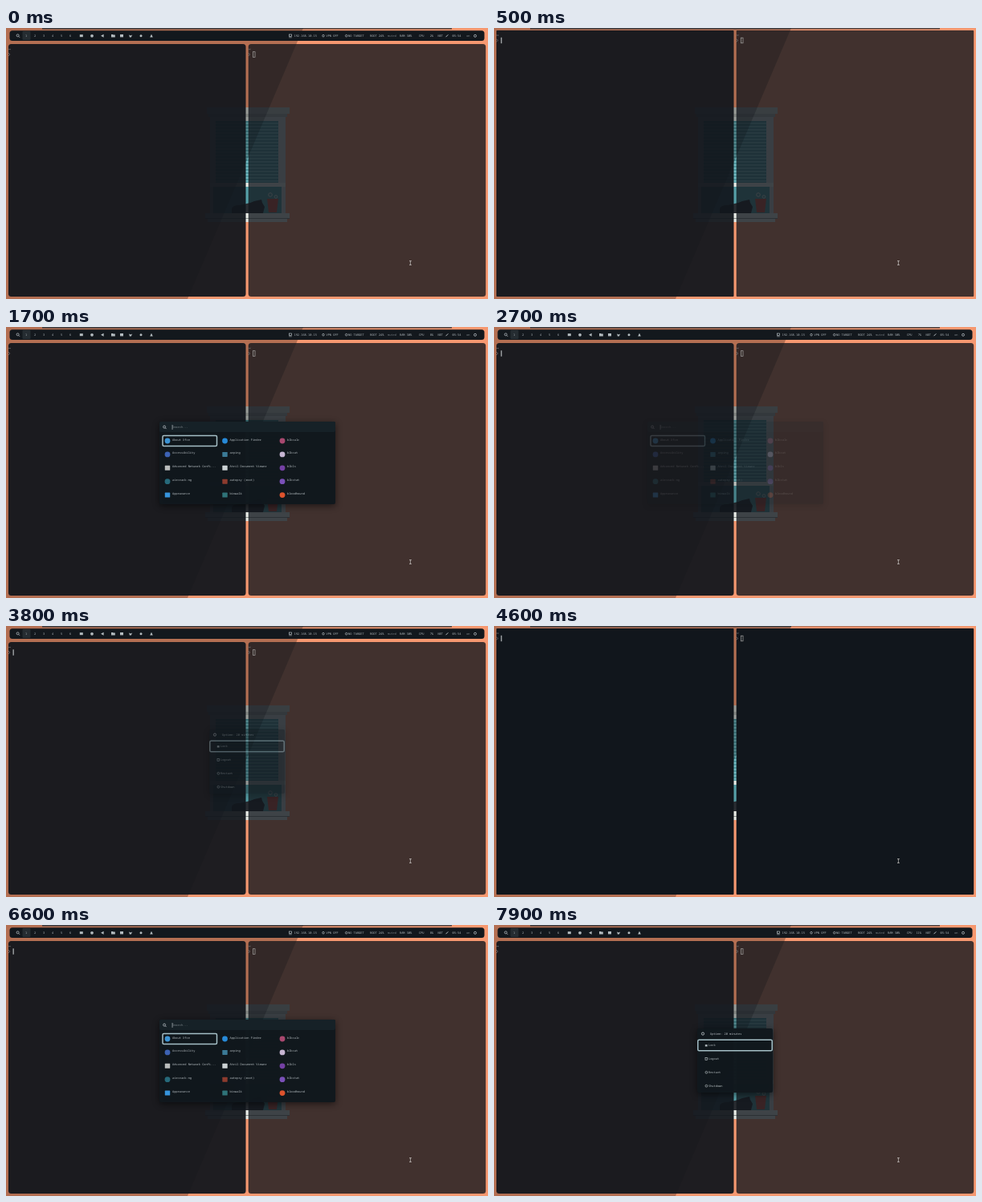
An HTML page that plays this animation: 600 by 338 pixels, repeating every 8000 ms.

```html
<!DOCTYPE html>
<html lang="en">
<head>
<meta charset="utf-8">
<title>Desktop</title>
<style>
html, body { margin: 0; width: 100%; height: 100%; overflow: hidden; background: #f69870; }
svg { display: block; width: 600px; height: 338px; }
text { font: 3.65px "Noto Sans Mono", "DejaVu Sans Mono", monospace; fill: #b4bcc0; text-rendering: geometricPrecision; white-space: pre; }
</style>
</head>
<body>
<svg id="stage" viewBox="0 0 600 338"></svg>
<script>
const stage = document.getElementById('stage');
const NS = 'http://www.w3.org/2000/svg';

function add(parent, tag, attrs = {}, text) {
  const el = document.createElementNS(NS, tag);
  for (const k in attrs) el.setAttribute(k, attrs[k]);
  if (text) el.textContent = text;
  parent.append(el);
  return el;
}
const group = (p, attrs) => add(p, 'g', attrs);
const rect = (p, x, y, width, height, fill, more) => add(p, 'rect', { x, y, width, height, fill, ...more });
const dot = (p, cx, cy, r, fill, more) => add(p, 'circle', { cx, cy, r, fill, ...more });
const path = (p, d, fill, more) => add(p, 'path', { d, fill, ...more });
const label = (p, x, y, s, more) => add(p, 'text', { x, y, ...more }, s);
const line = (p, d, stroke, width = .6) => path(p, d, 'none', { stroke, 'stroke-width': width });

const PALE = '#b4bcc0', DARK = '#11161c';

const blur = add(add(stage, 'defs'), 'filter', { id: 'blur', x: '-20%', y: '-20%', width: '140%', height: '140%' });
add(blur, 'feGaussianBlur', { stdDeviation: 4 });

// Wallpaper
const wall = group(stage);
rect(wall, 0, 0, 600, 338, '#f69870');
rect(wall, 250, 99, 103, 8, '#cfd3cd');
rect(wall, 252, 107, 98, 4, '#b3b7b3');
rect(wall, 254, 111, 94, 120, '#d2d7d3');
rect(wall, 261, 116, 78, 77, '#4f9aa2');
for (let y = 118; y < 193; y += 4) rect(wall, 261, y, 78, 1.8, '#79bfc6');
rect(wall, 258, 198, 85, 33, '#56a0a8');
rect(wall, 254, 193, 94, 5, '#e9ece6');
path(wall, 'M281 231V226Q281 221 291 221L304 218L309 216L318 214L319 218L322 223L320 231Z', '#292c31');
path(wall, 'M325 213H339L337 230H327Z', '#cf5545');
dot(wall, 329, 208, 2.3, 'none', { stroke: '#d8e3e0' });
dot(wall, 336, 210.5, 1.8, 'none', { stroke: '#d8e3e0' });
rect(wall, 248, 231, 105, 6, '#e9ece6');
rect(wall, 248, 237, 105, 1, '#8d928f');
rect(wall, 251, 238, 99, 4, '#e9ece6');
path(wall, 'M0 0H370L226 338H0Z', '#000', { opacity: .27 });
rect(wall, 45, 0, 325, 1.5, '#3b3b3f');
const strip = rect(wall, 370, 0, 185, 1.5, '#4f4442');

// Terminals
function terminal(x) {
  const pane = rect(stage, x, 20, 295.5, 315, DARK);
  const prompt = group(stage);
  line(prompt, `M${x} 27q.8-1 1.5-.4t1.4-.4M${x} 31l1.8 2-1.8 2`, '#8b8f94');
  return { pane, prompt };
}
const left = terminal(3), right = terminal(301.7);
const caret = rect(left.prompt, 8.6, 29.3, 1.1, 7.4, '#c3c8ca');
rect(right.prompt, 307.4, 29.7, 2.6, 6.6, 'none', { stroke: '#a6a5a4', 'stroke-width': .7 });

// Bar
const bar = group(stage);
rect(bar, 4.5, 3.3, 591, 12.6, '#13181d', { rx: 3.5 });
rect(bar, 20.5, 4, 10, 11, '#252c31', { rx: 1 });

function lens(p, x, y) {
  dot(p, x - .4, y - .4, 1.5, 'none', { stroke: PALE, 'stroke-width': .8 });
  line(p, `M${x + .7} ${y + .7}l1.4 1.4`, PALE, .9);
}
lens(bar, 15, 9.7);
for (let i = 1; i < 7; i++) label(bar, 14 + 11 * i, 11, i, { 'text-anchor': 'middle' });
rect(bar, 91.8, 8.2, 4, 3, PALE);
dot(bar, 107, 9.8, 1.9, PALE);
path(bar, 'M118 9.8l3.6-2v4Z', PALE);
path(bar, 'M131 8h2l.6.6h2.2v3h-4.8Z', PALE);
rect(bar, 142, 8, 4, 3.4, PALE);
path(bar, 'M153.2 8.6l2 1 2-1-1.4 2.8h-2Z', PALE);
dot(bar, 168, 9.8, 1.5, PALE);
path(bar, 'M181 7.7l1.8 3.8h-3.6Z', PALE);

rect(bar, 352.4, 8, 3.2, 2.6, 'none', { stroke: PALE, 'stroke-width': .7 });
line(bar, 'M352.2 11.8h3.6', PALE);
dot(bar, 395, 9.7, 1.3, 'none', { stroke: PALE, 'stroke-width': .7 });
dot(bar, 423.7, 9.7, 1.3, 'none', { stroke: PALE, 'stroke-width': .7 });
[[358.5, '192.168.10.15'], [398.5, 'VPN OFF'], [426, 'NO TARGET'], [453, 'ROOT 24%'],
 [490, 'RAM 30%'], [514, 'CPU'], [537.5, 'NET'], [555.5, '05:54']]
  .forEach(([x, s]) => label(bar, x, 11, s));
label(bar, 475, 11, 'muted', { opacity: .6 });
const cpu = label(bar, 532, 11, '2%', { 'text-anchor': 'end' });
line(bar, 'M547.5 11.2l2.8-2.8', PALE, 1);
label(bar, 573.2, 11, 'on', { opacity: .7 });
dot(bar, 584, 9.8, 1.5, 'none', { stroke: PALE, 'stroke-width': .8 });

// Popups
function popup(x, y, w, h) {
  const p = group(stage);
  rect(p, x, y + 2, w, h, '#000', { opacity: .55, filter: 'url(#blur)' });
  rect(p, x, y, w, h, '#11181d', { rx: 2, opacity: .97 });
  return p;
}
const selection = (p, x, y, w, h) =>
  rect(p, x, y, w, h, 'none', { rx: 1.5, stroke: '#a5bfc6', 'stroke-width': 1.5 });

const launcher = popup(191, 118, 219, 103);
rect(launcher, 191, 118, 219, 13, '#162127', { rx: 2 });
lens(launcher, 197.5, 125);
label(launcher, 207, 126.4, 'Search...', { opacity: .65 });
rect(launcher, 206.7, 122, .7, 6, PALE);
selection(launcher, 195, 135.5, 67.5, 13);
const apps = [
  ['About Xfce', 'o#3c94d4'], ['Accessibility', 'o#3c62b4'], ['Advanced Network Confi...', '#b9bdbd'],
  ['aircrack-ng', 'o#266a7b'], ['Appearance', '#3694dc'],
  ['Application Finder', 'o#278ad8'], ['arping', '#3b7a96'], ['Atril Document Viewer', '#cbd2d4'],
  ['autopsy (root)', '#8d3b2e'], ['binwalk', '#2f7378'],
  ['blkcalc', 'o#a8486f'], ['blkcat', 'o#c6b5d2'], ['blkls', 'o#7440a4'],
  ['blkstat', 'o#7a50b8'], ['bloodhound', 'o#dd532d']
];
apps.forEach(([name, icon], i) => {
  const x = 201 + 71.5 * Math.floor(i / 5), y = 142 + 16.9 * (i % 5);
  if (icon[0] === 'o') dot(launcher, x, y, 3.4, icon.slice(1));
  else rect(launcher, x - 3.2, y - 3, 6.4, 6, icon, { rx: .6 });
  label(launcher, x + 6, y - .5, name);
});

const power = popup(253, 129, 94, 80);
dot(power, 260, 135.6, 1.6, 'none', { stroke: PALE, 'stroke-width': .9 });
label(power, 269, 137, 'Uptime: 20 minutes');
selection(power, 253.8, 143.2, 92.4, 13.6);
['Lock', 'Logout', 'Restart', 'Shutdown'].forEach((name, i) => {
  const y = 150 + 16.9 * i;
  if (i === 0) rect(power, 262.8, y - .8, 2.8, 2.3, PALE);
  else if (i === 1) rect(power, 263, y - 1.4, 2.6, 2.8, 'none', { stroke: PALE, 'stroke-width': .7 });
  else dot(power, 264.4, y, 1.4, 'none', { stroke: PALE, 'stroke-width': .7 });
  label(power, 267, y + 1.4, name);
});

// Mouse pointer
line(stage, 'M502 290.5h2.8M502 295.5h2.8M503.4 290.5v5', '#d0ccca', .7);

const ramp = (t, a, b) => Math.min(1, Math.max(0, (t - a) / (b - a)));
const pulse = (t, a, b) => Math.min(ramp(t, a, a + 400), 1 - ramp(t, b, b + 500));
const fade = (el, v) => el.setAttribute('opacity', v);
const blinks = [200, 800, 1300, 1700, 2300, 2800, 3300, 4900, 5600, 6100, 6600, 7100, 7500, 7800];

function place({ pane, prompt }, full, alpha) {
  pane.setAttribute('y', full ? 3 : 20);
  pane.setAttribute('height', full ? 332 : 315);
  pane.setAttribute('rx', full ? 1 : 3.5);
  prompt.setAttribute('transform', `translate(0 ${full ? -17.5 : 0})`);
  fade(pane, alpha);
}

function draw(t) {
  const full = (t >= 400 && t < 700) || (t >= 4000 && t < 4800);
  const solid = Math.min(ramp(t, 4000, 4400), 1 - ramp(t, 4600, 4800));
  place(left, full, .94 + .06 * solid);
  place(right, full, .79 + .21 * solid);
  fade(strip, 1 - .65 * solid);
  fade(bar, full ? 0 : t < 400 ? 1 : t < 4000 ? ramp(t, 600, 1000) : ramp(t, 4700, 5200));
  cpu.textContent = (t < 400 ? 2 : t < 2600 ? 8 : t < 4800 ? 7 : t < 7000 ? 8 : 11) + '%';
  fade(caret, blinks.filter(b => b <= t).length % 2);
  fade(launcher, Math.max(pulse(t, 1200, 2300), pulse(t, 5600, 6800)));
  fade(power, Math.max(pulse(t, 2900, 3500), pulse(t, 7400, 8000)));
}

const start = performance.now();
function tick() {
  const t = (performance.now() - start) % 8000;
  draw(Math.floor(t / 100) * 100);
  requestAnimationFrame(tick);
}
tick();
</script>
</body>
</html>
```
